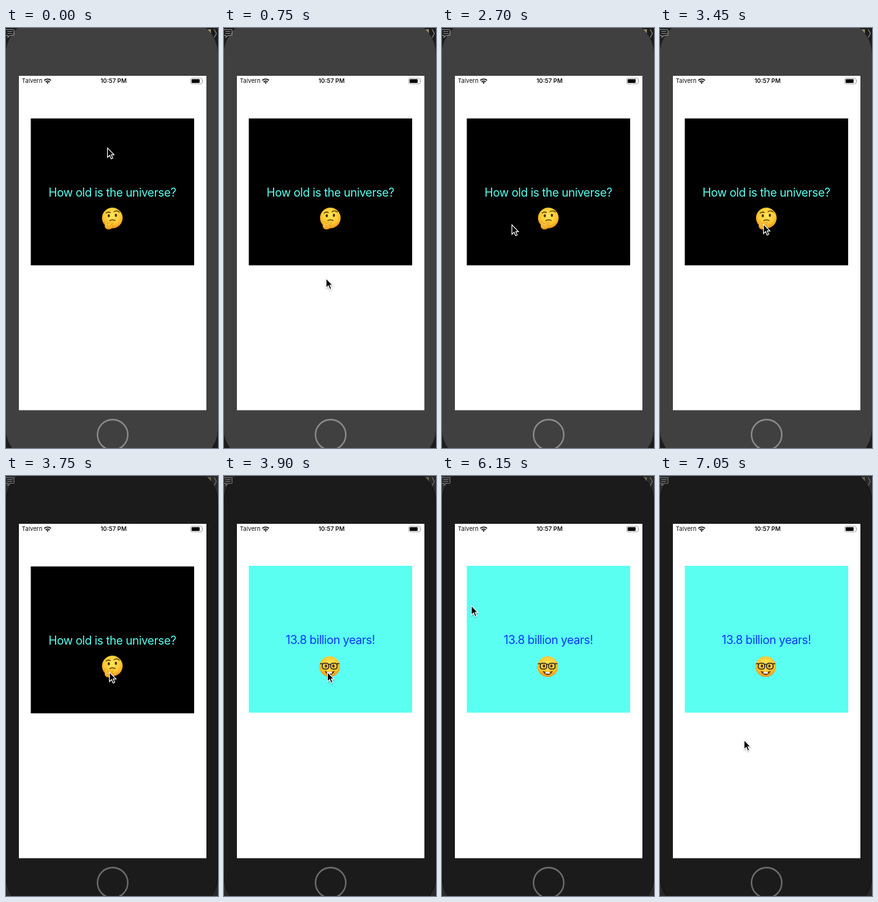
Animation of 329x650 px, one loop 8 s. Source, as an HTML page:

```html
<!DOCTYPE html>
<html lang="en">
<head>
<meta charset="utf-8">
<title>Flip card</title>
<style>
  html, body { margin: 0; width: 100%; height: 100%; overflow: hidden; background: #1c1c1c; }
  svg { display: block; }
  text { font-family: Inter, Roboto, "Liberation Sans", sans-serif; }
  .status { font-size: 9.2px; fill: #111; }
  .label { font-size: 18px; letter-spacing: -.4px; text-anchor: middle; }
  #scene { --bg: #1c1c1c; --body: #404040; --edge: #3a3a3a; --ring: #8a8a8a; --icon: #8c8c8c; --tan: #978a60; }
  #scene.dark { --bg: #292929; --body: #1b1b1b; --edge: #101010; --ring: #6c6c6c; --icon: #757575; --tan: #70664a; }
</style>
</head>
<body>
<svg id="scene" width="329" height="650" viewBox="0 0 329 650">
  <defs>
    <radialGradient id="skin" cx=".5" cy=".38" r=".62">
      <stop offset="0" stop-color="#ffe65c"/>
      <stop offset=".65" stop-color="#fdc92f"/>
      <stop offset="1" stop-color="#ee9418"/>
    </radialGradient>
    <linearGradient id="hand" x1="0" y1="0" x2="0" y2="1">
      <stop offset="0" stop-color="#ffd64a"/>
      <stop offset="1" stop-color="#f0a01f"/>
    </linearGradient>
    <filter id="shadow" x="-50%" y="-50%" width="200%" height="200%">
      <feDropShadow dx="0" dy="1" stdDeviation="1" flood-opacity=".4"/>
    </filter>
  </defs>

  <!-- Desktop behind the phone -->
  <rect width="329" height="650" style="fill:var(--bg)"/>
  <rect x="306" y="2" width="12" height="9" style="fill:var(--tan)"/>
  <path d="M323 2l3.500 6.500l-3.500 6.500" fill="none" stroke-width="1.200" style="stroke:var(--icon)"/>

  <!-- Phone -->
  <rect x="0" y="-12" width="328.500" height="684" rx="52" style="fill:var(--body);stroke:var(--edge)"/>
  <g fill="none" stroke-width="1.200" style="stroke:var(--icon)">
    <path d="M0 2.500h11q1.500 0 1.500 1.500v6q0 1.500 -1.500 1.500h-5l-3 3v-3h-3"/>
    <path d="M2 5.500h8M2 8.500h8"/>
  </g>
  <circle cx="165.500" cy="629.500" r="23.500" fill="none" stroke-width="2.300" style="stroke:var(--ring)"/>
  <rect x="20" y="74" width="291" height="517.500" fill="#fff"/>

  <!-- Status bar -->
  <text class="status" x="24.500" y="85.300">Talvern</text>
  <g fill="none" stroke="#111" stroke-width="1.700">
    <path d="M59.400 81.200a7.300 7.300 0 0 1 10.400 0"/>
    <path d="M61.400 83.400a4.500 4.500 0 0 1 6.400 0"/>
  </g>
  <path d="M64.600 86.400l-1.700 -1.800a2.400 2.400 0 0 1 3.400 0z" fill="#111"/>
  <text class="status" x="167" y="85.300" text-anchor="middle" font-weight="600">10:57 PM</text>
  <rect x="286.500" y="77.800" width="18" height="8.600" rx="2.200" fill="none" stroke="#999" stroke-width=".9"/>
  <rect x="288" y="79.300" width="12.500" height="5.600" rx="1" fill="#000"/>
  <path d="M305.700 80.700q1.400 1.400 0 2.800z" fill="#999"/>

  <!-- Question side -->
  <g id="front">
    <rect x="38.500" y="140" width="253.500" height="227.300" fill="#000"/>
    <text class="label" x="165" y="260.700" fill="#5afff0">How old is the universe?</text>
    <g transform="translate(165 294)">
      <circle r="16" fill="url(#skin)"/>
      <g fill="none" stroke="#694008" stroke-linecap="round">
        <path d="M-9.500 -7.500q3 -2.800 6.500 -.8" stroke-width="1.500"/>
        <path d="M2.500 -9.500q4 -3 8.500 .3" stroke-width="1.500"/>
        <path d="M-4 4.200q4 -2 8.500 -.3" stroke-width="1.500"/>
      </g>
      <g fill="#533106">
        <ellipse cx="-5.500" cy="-3.400" rx="1.800" ry="2.400"/>
        <ellipse cx="5.500" cy="-4" rx="1.800" ry="2.400"/>
      </g>
      <path d="M-11 5.500q1.500 -2 2.600 .3l.8 3.200l8.200 -3q2.300 -.2 1.500 1.700l-4 2.500q3.200 .5 2.600 2.800q-1.200 4.300 -6.200 4.500q-6 0 -6.200 -5.500z"
        fill="url(#hand)" stroke="#d8841a" stroke-width=".6"/>
    </g>
  </g>

  <!-- Answer side -->
  <g id="back">
    <rect x="38.500" y="139" width="253.500" height="227.300" fill="#5afff2"/>
    <text class="label" x="165" y="259.800" fill="#0b36ff">13.8 billion years!</text>
    <g transform="translate(164 295)">
      <circle r="16" fill="url(#skin)"/>
      <path d="M-8 6.500q8 3.500 16 0q-2.500 6.500 -8 6.500t-8 -6.500z" fill="#6b3b0a"/>
      <path d="M-3.500 8.200h7v2.600h-7z" fill="#fff"/>
      <g fill="#533106">
        <ellipse cx="-5.800" cy="-1" rx="1.900" ry="2.500"/>
        <ellipse cx="5.800" cy="-1" rx="1.900" ry="2.500"/>
      </g>
      <g fill="none" stroke="#2b2620" stroke-width="1.600">
        <rect x="-11.500" y="-5.300" width="10" height="9" rx="3.500"/>
        <rect x="1.500" y="-5.300" width="10" height="9" rx="3.500"/>
        <path d="M-15 -4.500h4M11 -4.500h4M-2 -3q2 -1.500 4 0"/>
      </g>
    </g>
  </g>

  <g id="cursor">
    <path d="M.5 .7V15.200L3.900 12L6.300 17.400L8.700 16.300L6.400 11.100H10.700Z"
      fill="#000" stroke="#fff" stroke-width="1.100" filter="url(#shadow)"/>
  </g>
</svg>
<script>
  const LOOP = 8000, TICK = 150;
  const DARK_AT = 3750, FLIP_AT = 3900;

  // Pointer moves: start time, then one position per tick
  const moves = [
    [0, [[157, 185]]],
    [150, [[198, 212], [243, 275], [254, 342], [210, 389], [158, 387]]],
    [1950, [[114, 393], [87, 394], [77, 369], [80, 337], [92, 312], [108, 304], [125, 303]]],
    [3000, [[138, 302], [149, 302], [157, 302], [160, 303]]],
    [5400, [[161, 303], [193, 362], [150, 433], [62, 420], [13, 320], [45, 200], [125, 141]]],
    [6450, [[210, 146], [281, 222], [275, 330], [205, 411], [130, 408]]]
  ];

  const $ = id => document.getElementById(id);
  const scene = $("scene"), front = $("front"), back = $("back"), cursor = $("cursor");
  const show = (el, on) => el.setAttribute("visibility", on ? "visible" : "hidden");

  function pointerAt(t) {
    const [start, path] = moves.filter(m => m[0] <= t).pop();
    return path[Math.min(path.length - 1, Math.floor((t - start) / TICK))];
  }

  function draw(t) {
    const [x, y] = pointerAt(t);
    cursor.setAttribute("transform", `translate(${x} ${y})`);
    scene.classList.toggle("dark", t >= DARK_AT);
    show(front, t < FLIP_AT);
    show(back, t >= FLIP_AT);
  }

  const begin = performance.now();
  function loop() {
    draw((performance.now() - begin) % LOOP);
    requestAnimationFrame(loop);
  }
  loop();
</script>
</body>
</html>
```
